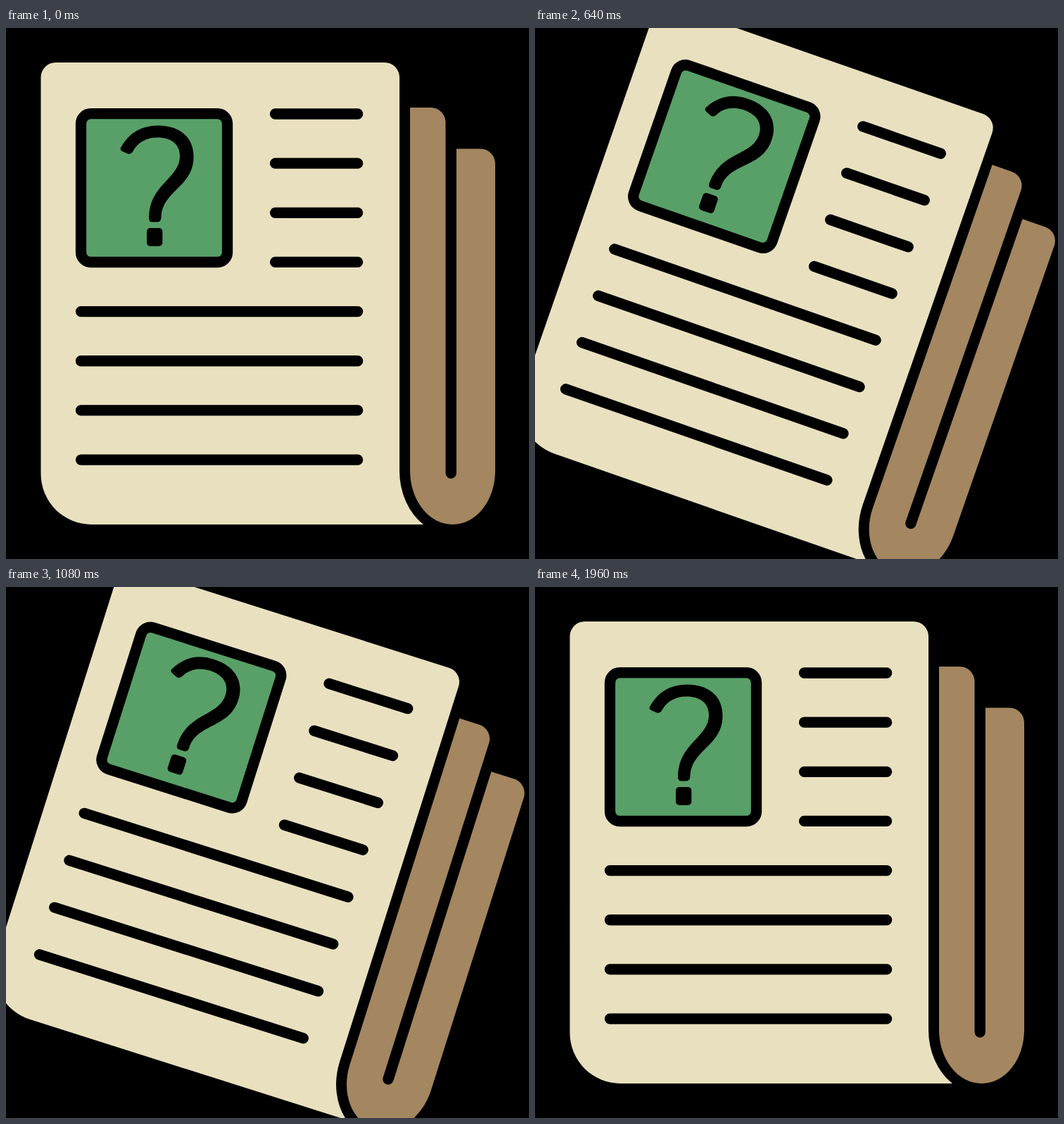
Recreate the animation shown at these times as an HTML page. Size 743 by 754 pixels, loop 2 s.

```html
<!DOCTYPE html>
<html lang="en">
<head>
<meta charset="utf-8">
<title>Newspaper</title>
<style>
  html, body { margin: 0; width: 100%; height: 100%; overflow: hidden; background: #000; }
  svg { display: block; width: 100%; height: 100%; }
</style>
</head>
<body>
<svg viewBox="0 0 743 754">
  <rect width="743" height="754"/>
  <g id="paper">
    <path fill="#e9e0bf" d="M70.500 49H538a21 21 0 0 1 21 21V629A75.500 91 0 0 0 593 705H121.500a72 72 0 0 1-72-72V70a21 21 0 0 1 21-21Z"/>
    <path fill="#a48660" d="M574 113H603.500a21 21 0 0 1 21 21V632a7.700 7.700 0 0 0 15.400 0V171.500H674a21 21 0 0 1 21 21V629A60.500 76 0 0 1 574 629Z"/>
    <rect x="106.500" y="121.700" width="208" height="210.800" rx="14" fill="#58a068" stroke="#000" stroke-width="15.300"/>
    <path d="M163 170Q180 138.500 216 138.500C247 138.500 266.500 155 266.500 183C266.500 226 220.500 232 220.500 269Q220 275.500 215 275.500H207.500Q203 275.500 203 270C203 222 247 214 247 182C247 165 235 155.500 215 155.500C199 155.500 187 163 181 174Q178 180 173 178.500L166 175.500Q161.500 173.500 163 170Z"/>
    <rect x="200" y="284" width="22.300" height="25.700" rx="5"/>
    <path id="lines" stroke="#000" stroke-width="15.300" stroke-linecap="round"/>
  </g>
</svg>
<script>
  const LOOP = 2000, STEP = 40, PEAK = 30;
  const paper = document.getElementById('paper');

  // Four short lines beside the picture, then four full-width ones.
  document.getElementById('lines').setAttribute('d',
    Array.from({ length: 8 }, (_, i) =>
      `M${i < 4 ? 382.5 : 106.5} ${122 + i * 70.15}H499.600`).join(''));

  // Steady tilt for half the loop, then a damped swing back to rest.
  function angleAt(ms) {
    const p = ms / LOOP * 2;
    if (p <= 1) return PEAK * p;
    const x = p - 1;
    return PEAK * (1 - x) ** 4.7 * Math.cos(2 * Math.PI * 1.035 * x);
  }

  function render(ms) {
    const t = Math.floor(ms % LOOP / STEP) * STEP;
    paper.setAttribute('transform', `rotate(${angleAt(t)} 371.5 377)`);
  }

  const start = performance.now();
  function tick() {
    render(performance.now() - start);
    requestAnimationFrame(tick);
  }
  tick();
</script>
</body>
</html>
```
